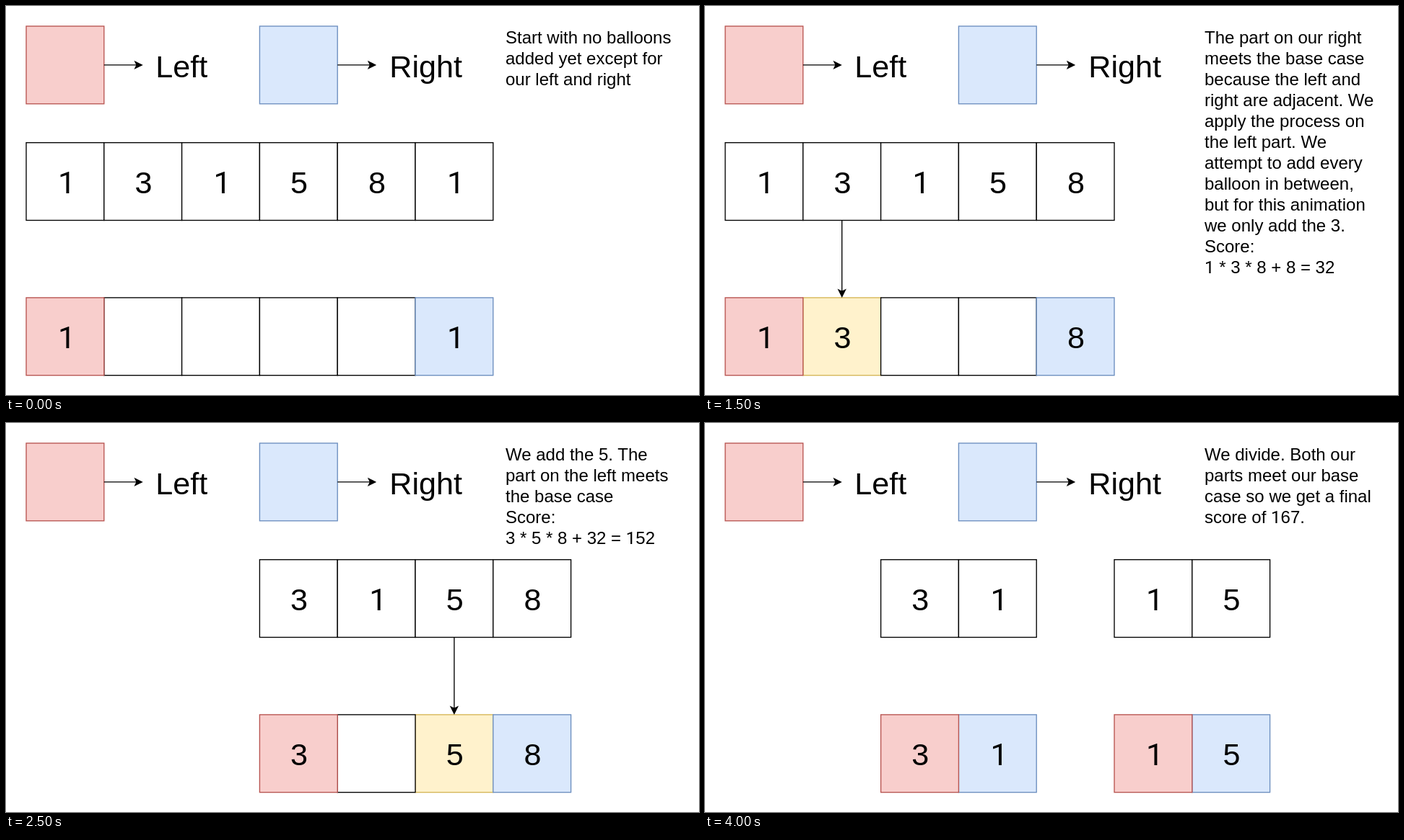
An HTML page for the animation above (4.5 s loop, 960 by 540 pixels).

```html
<!DOCTYPE html>
<html lang="en">
<head>
<meta charset="utf-8">
<title>Dividing balloons</title>
<style>
  html, body { margin: 0; width: 100%; height: 100%; overflow: hidden; background: #fff; }
  svg { display: block; width: 960px; height: 540px; }
  text { font-family: "Liberation Sans", Arial, sans-serif; font-size: 24px; fill: #000; white-space: pre; }
  .big { font-size: 43.1px; text-anchor: middle; }
  .one { font-family: Roboto, sans-serif; }
  rect, path { stroke-width: 1.35; }
  path { stroke: #000; }
</style>
</head>
<body>
<svg viewBox="0 0 960 540"><g id="legend"></g><g id="scene"></g></svg>
<script>
const CELL = 107.8, LEFT = 28, TOP_ROW = 189.7, BOTTOM_ROW = 404.9;
const STEP_MS = 500;

// Later kinds are painted over earlier ones: added, empty, right, left.
const PAINT = {
  A: ['#fff2cc', '#d6b656'],
  '.': ['#fff', '#000'],
  R: ['#dae8fc', '#6c8ebf'],
  L: ['#f8cecc', '#b85450']
};

// Each group: first column, balloons, kinds in the lower row.
const STEPS = [
  { groups: [[0, '131581', 'L....R']],
    note: 'Start with no balloons\nadded yet except for\nour left and right' },
  { groups: [[0, '131581', 'L...AR']],
    note: 'We attempt to add\nevery balloon in\nbetween, but for this\nanimation we only\nadd the 8.\nScore:\n1 * 8 * 1 = 8' },
  { groups: [[0, '13158', 'L...R'], [6, '81', 'LR']],
    note: 'By adding 8 we have\nnow divided our input\ninto two parts. We\nrepeat the process on\neach part.' },
  { groups: [[0, '13158', 'LA..R']],
    note: 'The part on our right\nmeets the base case\nbecause the left and\nright are adjacent. We\napply the process on\nthe left part. We\nattempt to add every\nballoon in between,\nbut for this animation\nwe only add the 3.\nScore:\n1 * 3 * 8 + 8 = 32' },
  { groups: [[0, '13', 'LR'], [3, '3158', 'L..R']],
    note: 'We divide our input\nand apply the process\non each part' },
  { groups: [[3, '3158', 'L.AR']],
    note: 'We add the 5. The\npart on the left meets\nthe base case\nScore:\n3 * 5 * 8 + 32 = 152' },
  { groups: [[2, '315', 'L.R'], [6, '58', 'LR']],
    note: 'Once again we divide\nand apply the process\non each part' },
  { groups: [[2, '315', 'LAR']],
    note: 'We add the 1.\nScore:\n3 * 1 * 5 + 152 = 167' },
  { groups: [[2, '31', 'LR'], [5, '15', 'LR']],
    note: 'We divide. Both our\nparts meet our base\ncase so we get a final\nscore of 167.' }
];

const columnX = column => LEFT + column * CELL;

function box(x, y, kind) {
  const [fill, stroke] = PAINT[kind];
  return `<rect x="${x}" y="${y}" width="${CELL}" height="${CELL}" fill="${fill}" stroke="${stroke}"/>`;
}

function arrow(x, y, length, angle) {
  const tip = length - 1.5;
  return `<path transform="translate(${x} ${y}) rotate(${angle})"
    d="M0 0H${tip - 7.1}M${tip} 0l-9.4 4.7 2.3 -4.7 -2.3 -4.7z"/>`;
}

// A "1" without a foot, as in the other grotesque digits.
const footless = text => text.replace(/1/g, '<tspan class="one">1</tspan>');

function digit(value, x, y) {
  const nudge = value === '1' ? 2.2 : 0.8;
  return `<text class="big" x="${x + CELL / 2 + nudge}" y="${y + 70.4}">${footless(value)}</text>`;
}

function drawGroup([first, values, kinds]) {
  const cells = [...values].map((value, i) => ({ value, kind: kinds[i], x: columnX(first + i) }));
  const paintOrder = Object.keys(PAINT);
  const byPaint = [...cells].sort((a, b) => paintOrder.indexOf(a.kind) - paintOrder.indexOf(b.kind));
  return cells.map(c => box(c.x, TOP_ROW, '.') + digit(c.value, c.x, TOP_ROW)).join('') +
    byPaint.map(c => box(c.x, BOTTOM_ROW, c.kind)).join('') +
    cells.filter(c => c.kind !== '.').map(c => digit(c.value, c.x, BOTTOM_ROW)).join('') +
    cells.filter(c => c.kind === 'A')
      .map(c => arrow(c.x + CELL / 2, TOP_ROW + CELL, BOTTOM_ROW - TOP_ROW - CELL, 90)).join('');
}

const drawNote = note => note.split('\n')
  .map((line, i) => `<text x="692" y="${51.5 + 29 * i}">${footless(line)}</text>`).join('');

const drawLegend = (column, kind, label, labelX) =>
  box(columnX(column), 28, kind) + arrow(columnX(column + 1), 81.9, 54, 0) +
  `<text class="big" x="${labelX}" y="98.6">${label}</text>`;

document.getElementById('legend').innerHTML =
  drawLegend(0, 'L', 'Left', 243.2) + drawLegend(3, 'R', 'Right', 581.6);

const scene = document.getElementById('scene');
const start = performance.now();
let shown = -1;

function tick() {
  const step = Math.floor((performance.now() - start) / STEP_MS) % STEPS.length;
  if (step !== shown) {
    shown = step;
    const { groups, note } = STEPS[step];
    scene.innerHTML = groups.map(drawGroup).join('') + drawNote(note);
  }
  requestAnimationFrame(tick);
}
tick();
</script>
</body>
</html>
```
